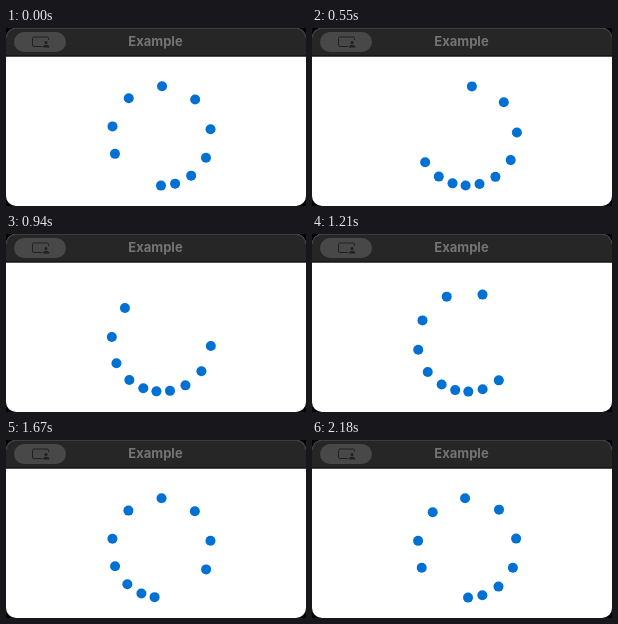
Animation, 300 px wide and 178 px high, one loop 2210 ms. Source, as an HTML page:

```html
<!DOCTYPE html>
<html lang="en">
<head>
<meta charset="utf-8">
<title>Example</title>
<style>
  html, body { margin: 0; width: 100%; height: 100%; overflow: hidden; background: #000; }
  svg { display: block; width: 300px; height: 178px; }
  .title { font: 700 13px Inter, "Liberation Sans", sans-serif; fill: #747474; text-anchor: middle; }
  .icon { fill: none; stroke: #202020; stroke-width: 1; }
</style>
</head>
<body>
<svg viewBox="0 0 300 178">
  <defs>
    <clipPath id="window"><rect width="300" height="178" rx="10"/></clipPath>
  </defs>
  <g clip-path="url(#window)">
    <rect width="300" height="178" fill="#fff"/>
    <rect width="300" height="28" fill="#262626"/>
    <rect y="27.5" width="300" height="1.2" fill="#080808"/>
  </g>
  <path d="M.5 10A9.5 9.5 0 0 1 10 .5H290A9.5 9.5 0 0 1 299.5 10" fill="none" stroke="#3c3c3c"/>
  <rect x="8" y="4" width="52" height="20" rx="10" fill="#484848"/>
  <g class="icon">
    <path d="M36 18.5H28Q26.5 18.5 26.5 17V10.5Q26.5 9 28 9H41Q42.500 9 42.500 10.500V12"/>
    <circle cx="40" cy="14.500" r="1.500" fill="#202020" stroke="none"/>
    <path d="M37 19.500Q37 16.800 40 16.800T43.500 19.500Z" fill="#202020" stroke="none"/>
  </g>
  <text class="title" x="149.500" y="18" textLength="">Example</text>
  <g id="ring" fill="#0070d2"></g>
</svg>
<script>
  const LOOP = 2210, FPS = 33;
  const PERIOD = 2196, START = -0.0297, LAG = 0.08;
  const CENTER = { x: 155.3, y: 107.9 }, RADIUS = 49.7;
  const TAU = Math.PI * 2;
  const ring = document.getElementById("ring");

  const dots = Array.from({ length: 10 }, () => {
    const dot = document.createElementNS("http://www.w3.org/2000/svg", "circle");
    dot.setAttribute("r", 5);
    return ring.appendChild(dot);
  });

  // Clockwise angle from the top: slow near the bottom, fast near the top.
  const angle = turn => (186 + 360 * turn - 27.3 * Math.sin(TAU * turn)) * Math.PI / 180;

  function draw(now) {
    const step = Math.floor((now % LOOP + 5) * FPS / 1000);
    const turn = START + step * 1000 / FPS / PERIOD;
    dots.forEach((dot, i) => {
      const a = angle(turn - i * LAG);
      dot.setAttribute("cx", (CENTER.x + RADIUS * Math.sin(a)).toFixed(2));
      dot.setAttribute("cy", (CENTER.y - RADIUS * Math.cos(a)).toFixed(2));
    });
  }

  let begin;
  function tick(now) {
    begin ??= now;
    draw(now - begin);
    requestAnimationFrame(tick);
  }
  draw(0);
  requestAnimationFrame(tick);
</script>
</body>
</html>
```
